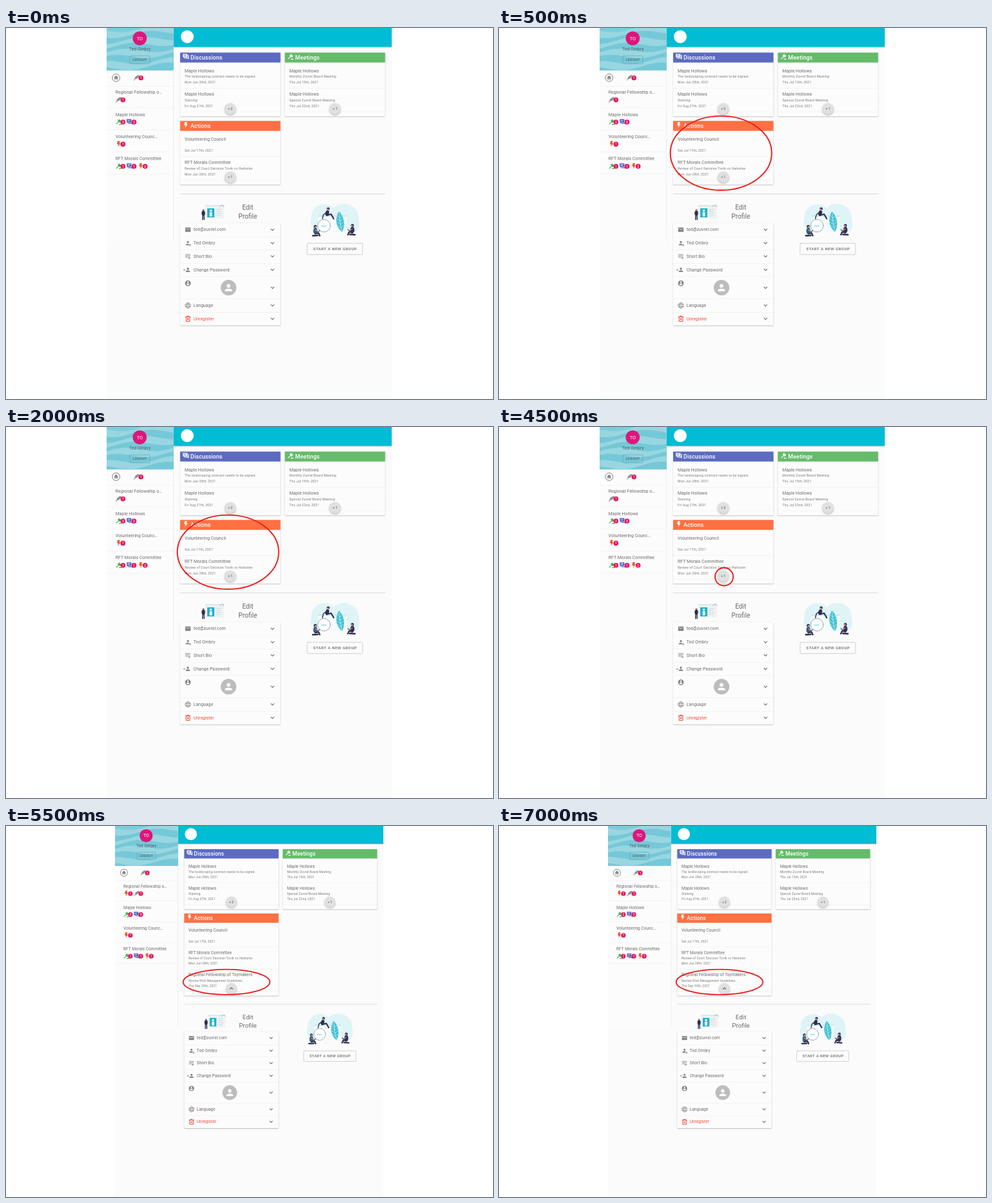
Animation, 755 px wide and 576 px high, one loop 8 s. Source, as an HTML page with a canvas:

```html
<!DOCTYPE html>
<html lang="en">
<head>
<meta charset="utf-8">
<title>Dashboard tour</title>
<style>
html, body { margin: 0; width: 100%; height: 100%; overflow: hidden; background: #fff; }
canvas { display: block; width: 755px; height: 576px; }
</style>
</head>
<body>
<canvas id="stage"></canvas>
<script>
const W = 755, H = 576, LOOP = 8000;
const canvas = document.getElementById('stage');
const ctx = canvas.getContext('2d');
const dpr = window.devicePixelRatio || 1;
canvas.width = W * dpr;
canvas.height = H * dpr;

const TEAL = '#00bcd4', INDIGO = '#5c6bc0', GREEN = '#66bb6a', ORANGE = '#ff7043';
const PINK = '#e9135f', INK = '#6a6a6a', SOFT = '#7a7a7a', ICON = '#808080';
const RULE = '#efefef', NAVY = '#2f2e50', SKIN = '#d49a98', RED = '#ea1b1b';
const TITLE = 6.82, SMALL = 5.11;

const icons = {
  person: ['M12 4a4 4 0 1 1 0 8a4 4 0 1 1 0-8zM4 20v-2c0-5 16-5 16 0v2z'],
  account: ['M12 2a10 10 0 1 0 0 20a10 10 0 1 0 0-20zM12 5a3 3 0 1 1 0 6a3 3 0 1 1 0-6zM12 19c-2.5 0-4.700-1.300-6-3.200c0-2 4-3.100 6-3.100s6 1.100 6 3.100c-1.300 1.900-3.500 3.200-6 3.200z'],
  bolt: ['M8 1h9l-3 8h5L9 23l2-10H6z'],
  gavel: ['M8 8l6-6 8 8-6 6zM11 11l2 2-9 9-2-2zM13 20h10v3H13z'],
  chat: ['M1 2h17v12H8l-4 4v-4H1zM4 5v2h11V5zM4 9v2h8V9zM20 6h3v17l-4-4H7v-3h13z'],
  quill: ['M22 2C12 3 6 8 5 15L1 23h2l4-6c8 0 12-5 15-15zM19 5L7 15l8-6z'],
  mail: ['M2 4h20v16H2zM4 6v2l8 5 8-5V6l-8 5z'],
  home: ['M12 5l-7 6h2v7h4v-5h2v5h4v-7h2z'],
  bio: ['M3 5h17M3 10h17M3 15h9M14 18h7M17 14v7', 2],
  key: ['M1 12h9M3 9v6M6 12v3', 2],
  globe: ['M2 12a10 10 0 1 0 20 0a10 10 0 1 0-20 0M8 12a4 10 0 1 0 8 0a4 10 0 1 0-8 0M3 8h18M3 16h18', 1.8],
  trash: ['M3 5h18M9 5V2h6v3M5 5v17h14V5M9 10l6 7M15 10l-6 7', 2.4],
  down: ['M6 9l6 6 6-6', 3],
  up: ['M6 15l6-6 6 6', 3]
};
for (const name in icons) icons[name][0] = new Path2D(icons[name][0]);

function icon(name, x, y, size, color) {
  const [path, stroke] = icons[name];
  ctx.save();
  ctx.translate(x, y);
  ctx.scale(size / 24, size / 24);
  ctx.translate(-12, -12);
  ctx.fillStyle = ctx.strokeStyle = color;
  if (stroke) { ctx.lineWidth = stroke; ctx.stroke(path); }
  else ctx.fill(path, 'evenodd');
  ctx.restore();
}

// y is close to the middle of the capital letters
function text(str, x, y, size, color, { weight = 400, spacing = 0.0094, align = 'left' } = {}) {
  ctx.font = `${weight} ${size}px Roboto, sans-serif`;
  ctx.letterSpacing = `${size * spacing}px`;
  ctx.textAlign = align;
  ctx.fillStyle = color;
  ctx.fillText(str, x, y + size * 0.32);
}

function box(x, y, w, h, color) {
  ctx.fillStyle = color;
  ctx.fillRect(x, y, w, h);
}

function oval(x, y, rx, ry, color, angle = 0) {
  ctx.beginPath();
  ctx.ellipse(x, y, rx, ry, angle, 0, Math.PI * 2);
  ctx.fillStyle = color;
  ctx.fill();
}

const disc = (x, y, r, color) => oval(x, y, r, r, color);

function ring(x, y, rx, ry, color, width) {
  ctx.beginPath();
  ctx.ellipse(x, y, rx, ry, 0, 0, Math.PI * 2);
  ctx.strokeStyle = color;
  ctx.lineWidth = width;
  ctx.stroke();
}

function polyline(points, color, width) {
  ctx.beginPath();
  points.forEach(([x, y]) => ctx.lineTo(x, y));
  ctx.strokeStyle = color;
  ctx.lineWidth = width;
  ctx.lineCap = ctx.lineJoin = 'round';
  ctx.stroke();
}

function clipTo(x, y, w, h) {
  ctx.beginPath();
  ctx.rect(x, y, w, h);
  ctx.clip();
}

function shadowed(blur, drop, alpha, draw) {
  ctx.save();
  ctx.shadowColor = `rgba(0,0,0,${alpha})`;
  ctx.shadowBlur = blur * dpr;
  ctx.shadowOffsetY = drop * dpr;
  draw();
  ctx.restore();
}

function panel(x, y, w, h) {
  shadowed(1.6, 0.8, 0.27, () => {
    ctx.beginPath();
    ctx.roundRect(x, y, w, h, 1.5);
    ctx.fillStyle = '#fcfcfc';
    ctx.fill();
  });
}

function outlineButton(x, y, w, h, color) {
  ctx.beginPath();
  ctx.roundRect(x, y, w, h, 1.5);
  ctx.strokeStyle = color;
  ctx.lineWidth = 0.7;
  ctx.stroke();
}

function card(x, y, color, symbol, heading, rows, chip) {
  const h = 99 + (rows.length - 2) * 36.6;
  panel(x, y, 155.5, h);
  box(x, y, 155.5, 15.4, color);
  icon(symbol, x + 8.8, y + 6.2, 10, '#fff');
  text(heading, x + 16, y + 7.8, 8.9, '#fff', { weight: 500, spacing: 0.0125 });
  rows.forEach(([title, note, date], i) => {
    const top = y + i * 36.6;
    text(title, x + 7, top + 28.2, TITLE, INK);
    text(note, x + 7, top + 37.6, SMALL, SOFT, { spacing: 0.0333 });
    text(date, x + 7, top + 46.1, SMALL, SOFT, { spacing: 0.0333 });
    box(x, top + 55, 155.5, 0.6, RULE);
  });
  const chipX = x + 77.7, chipY = y + h - 11.8;
  shadowed(3, 1.3, 0.28, () => disc(chipX, chipY, 8.8, '#e0e0e0'));
  if (chip) text(chip, chipX, chipY, 5.1, '#666', { weight: 500, align: 'center' });
  else icon('up', chipX, chipY, 10, '#666');
}

function badge(x, y, n) {
  disc(x, y, 3.8, PINK);
  text(String(n), x, y + 0.2, 5, '#fff', { weight: 500, spacing: 0, align: 'center' });
}

const iconColor = { bolt: '#f4511e', gavel: '#4caf50', chat: '#3f51b5', quill: '#8a8a8a' };
function alerts(x, y, list) {
  list.forEach(([name, n], i) => {
    const left = x + i * 17.2;
    icon(name, left, y, 10, iconColor[name]);
    badge(left + 6.7, y + 0.3, n);
  });
}

function waves() {
  ctx.save();
  clipTo(156, 0, 103.5, 65.5);
  box(156, 0, 104, 66, '#7ccddb');
  for (let i = 0; i < 8; i++) {
    ctx.beginPath();
    ctx.moveTo(156, 70);
    for (let x = 0; x <= 104; x += 2) {
      ctx.lineTo(156 + x, 4 + i * 8.5 + 4 * Math.sin(x / 17 + i * 0.8) - x * 0.06);
    }
    ctx.lineTo(260, 70);
    ctx.fillStyle = `hsl(189 55% ${i % 2 ? 65 : 74}%)`;
    ctx.fill();
  }
  ctx.restore();
}

function sidebar(expanded) {
  box(156, 0, 103.5, 332, '#fcfcfc');
  box(259, 0, 0.8, 332, '#e9e9e9');
  waves();
  disc(207.3, 16, 10.8, '#dc177c');
  text('TO', 207.5, 16.2, 7.4, '#fff', { align: 'center' });
  text('Ted Ombry', 207.7, 33, TITLE, '#4e6067', { align: 'center' });
  outlineButton(192, 43.2, 31, 12.4, '#66a5b0');
  text('LOGOUT', 207.7, 49.4, SMALL, '#435b63', { weight: 500, spacing: 0.0893, align: 'center' });
  ring(170.7, 77.2, 5.9, 5.9, ICON, 1);
  icon('home', 170.7, 77.2, 11.5, ICON);
  alerts(202.5, 77.2, [['quill', 1]]);
  box(156, 90, 103, 0.6, RULE);

  const groups = [
    ['Regional Fellowship o…', expanded ? [['bolt', 1], ['quill', 1]] : [['quill', 1]]],
    ['Maple Hollows', [['gavel', 2], ['chat', 3]]],
    ['Volunteering Counc…', [['bolt', 1]]],
    ['RFT Morals Committee', [['gavel', 1], ['chat', 1], ['bolt', expanded ? 1 : 2]]]
  ];
  groups.forEach(([name, list], i) => {
    const y = 100 + i * 34.4;
    text(name, 169.8, y, TITLE, INK);
    alerts(174.6, y + 11.3, list);
    box(156, y + 23.5, 103, 0.6, RULE);
  });
}

function profileArt() {
  box(309, 275, 28.5, 21, '#eef2f3');
  box(309, 275, 28.5, 1.5, '#dde3e6');
  box(312, 280, 11, 14, '#1fb3cd');
  disc(317.5, 283.5, 1.7, '#fff');
  box(315.6, 286, 3.8, 6.5, '#fff');
  for (let i = 0; i < 4; i++) box(325.5, 281 + i * 3.2, 9 - (i % 2) * 2, 0.8, '#c9d3d7');
  polyline([[331, 277], [336, 274.5], [338, 278]], '#90a4ae', 0.7);
  disc(306, 282.6, 1.6, '#b9817c');
  oval(306, 287.5, 2.7, 4, NAVY);
  polyline([[305, 290], [304.7, 297.5]], NAVY, 1.5);
  polyline([[307, 290], [307.2, 297.5]], NAVY, 1.5);
}

function sitter(x, y, dir, shirt) {
  disc(x, y - 7.3, 2.4, NAVY);
  disc(x + dir * 0.8, y - 6.4, 1.6, SKIN);
  oval(x, y - 0.5, 3.2, 5, shirt);
  polyline([[x, y + 4], [x + dir * 5, y + 2.5], [x + dir * 7, y + 7]], NAVY, 2.2);
  polyline([[x - dir * 4, y + 7], [x + dir * 4, y + 6.5]], NAVY, 2.4);
  polyline([[x, y - 2], [x + dir * 4.5, y + 0.5]], SKIN, 1.1);
  polyline([[x + dir * 3, y + 1.5], [x + dir * 7, y - 1]], '#455a64', 1.4);
}

function leaf() {
  ctx.beginPath();
  ctx.moveTo(521, 317);
  ctx.bezierCurveTo(509, 306, 511, 294, 516, 285);
  ctx.bezierCurveTo(524, 292, 527, 306, 521, 317);
  ctx.fillStyle = '#3fc1d4';
  ctx.fill();
  polyline([[521, 317], [518, 302], [516.5, 288]], '#d8f1f5', 0.8);
  for (let i = 0; i < 4; i++) {
    const y = 310 - i * 5;
    polyline([[513, y - 4], [519 - i * 0.5, y], [524, y - 4]], '#d8f1f5', 0.6);
  }
}

function groupArt() {
  const blob = '#dff4f7';
  oval(492, 290, 19, 16, blob, -0.4);
  oval(525, 293, 22, 20, blob, 0.3);
  oval(488, 302, 16, 15, blob);
  oval(537, 304, 11, 14, blob);
  box(484, 291, 44, 26, '#f4fbfc');
  box(484, 291, 44, 2, '#c5eaf0');
  leaf();
  disc(493, 307, 9.8, '#fcfcfc');
  ring(493, 307, 9.8, 9.8, '#7b858c', 0.7);
  for (let i = -1; i < 2; i++) disc(492.5 + i * 2.6, 307.5, 0.8, TEAL);
  disc(499.5, 280.8, 2.3, NAVY);
  disc(499, 282, 1.4, SKIN);
  oval(498, 287.3, 2.8, 4.3, NAVY, 0.3);
  polyline([[497, 291], [504, 289], [508, 296]], NAVY, 2.2);
  polyline([[497, 286], [492, 290], [490.5, 296]], NAVY, 1.4);
  sitter(479.5, 315.5, 1, '#365f7b');
  sitter(537, 314, -1, NAVY);
}

function settings() {
  panel(270, 302.8, 155.5, 159);
  const rows = [
    [313.2, 'mail', 'ted@zuvrel.com'], [334, 'person', 'Ted Ombry'],
    [354.6, 'bio', 'Short Bio'], [375.4, 'person', 'Change Password'],
    [403.2, '', ''], [430.8, 'globe', 'Language'], [451.4, 'trash', 'Unregister']
  ];
  rows.forEach(([y, symbol, label], i) => {
    const color = symbol === 'trash' ? '#f4483d' : INK;
    if (symbol) icon(symbol, 282, y, 10, symbol === 'trash' ? color : ICON);
    text(label, 290.8, y, TITLE, color);
    icon('down', 413.2, y, 9, '#707070');
    if (i) box(270, y - (i === 4 ? 17.7 : 10.4), 155.5, 0.6, RULE);
  });
  disc(285.2, 337.2, 2.1, '#fcfcfc');
  ring(285.2, 337.2, 1.2, 1.2, ICON, 0.8);
  icon('key', 278.5, 375.5, 7, ICON);
  icon('account', 282, 396.4, 10.4, ICON);
  disc(345, 403.2, 12.1, '#bdbdbd');
  icon('person', 345, 403.2, 17, '#fff');
}

const zuvrel = 'Zuvrel Board Meeting';
const maple = 'Maple Hollows';
const discussions = [
  [maple, 'The landscaping contract needs to be signed.', 'Mon Jun 28th, 2021'],
  [maple, 'Staining', 'Fri Aug 27th, 2021']
];
const meetings = [
  [maple, `Monthly ${zuvrel}`, 'Thu Jul 15th, 2021'],
  [maple, `Special ${zuvrel}`, 'Thu Jul 22nd, 2021']
];
const actions = [
  ['Volunteering Council', '', 'Sat Jul 17th, 2021'],
  ['RFT Morals Committee', 'Review of Court Decision Tovik vs Harbolen', 'Mon Jun 28th, 2021'],
  ['Regional Fellowship of Toymakers', 'Review Risk Management Guidelines', 'Thu Sep 30th, 2021']
];

function page(expanded) {
  clipTo(156, 0, 442, 620);
  box(156, 0, 442, 620, '#fbfbfb');
  shadowed(2, 0.8, 0.25, () => box(259.5, 0, 338.5, 29.4, TEAL));
  sidebar(expanded);
  disc(281, 13.5, 10, '#fff');
  card(270, 38.2, INDIGO, 'chat', 'Discussions', discussions, '+ 2');
  card(432.3, 38.2, GREEN, 'gavel', 'Meetings', meetings, '+ 1');
  card(270, 144.3, ORANGE, 'bolt', 'Actions', expanded ? actions : actions.slice(0, 2), expanded ? '' : '+ 1');

  ctx.translate(0, expanded ? 36.6 : 0);
  box(270, 257.2, 318, 0.8, '#d2d2d2');
  profileArt();
  text('Edit', 374.8, 278.8, 10.2, INK, { spacing: 0, align: 'center' });
  text('Profile', 374.8, 292.8, 10.2, INK, { spacing: 0, align: 'center' });
  settings();
  groupArt();
  outlineButton(466.8, 334.2, 86, 17.6, '#bdbdbd');
  text('START A NEW GROUP', 510.2, 343, 5.96, '#666', { weight: 500, spacing: 0.0893, align: 'center' });
}

function draw(now) {
  const t = now % LOOP;
  const expanded = t >= 5500;
  ctx.setTransform(dpr, 0, 0, dpr, 0, 0);
  box(0, 0, W, H, '#fff');
  ctx.save();
  if (expanded) {
    const zoom = 416 / 442;
    ctx.translate(169 - 156 * zoom, 0);
    ctx.scale(zoom, zoom);
  }
  page(expanded);
  ctx.restore();

  if (expanded) ring(341.8, 242.3, 67.2, 19.6, RED, 1.8);
  else if (t >= 3000) ring(349, 232.5, 14, 14, RED, 1.9);
  else if (t >= 500) ring(344.2, 194.2, 78.6, 57.6, RED, 1.9);
  requestAnimationFrame(draw);
}
requestAnimationFrame(draw);
</script>
</body>
</html>
```
